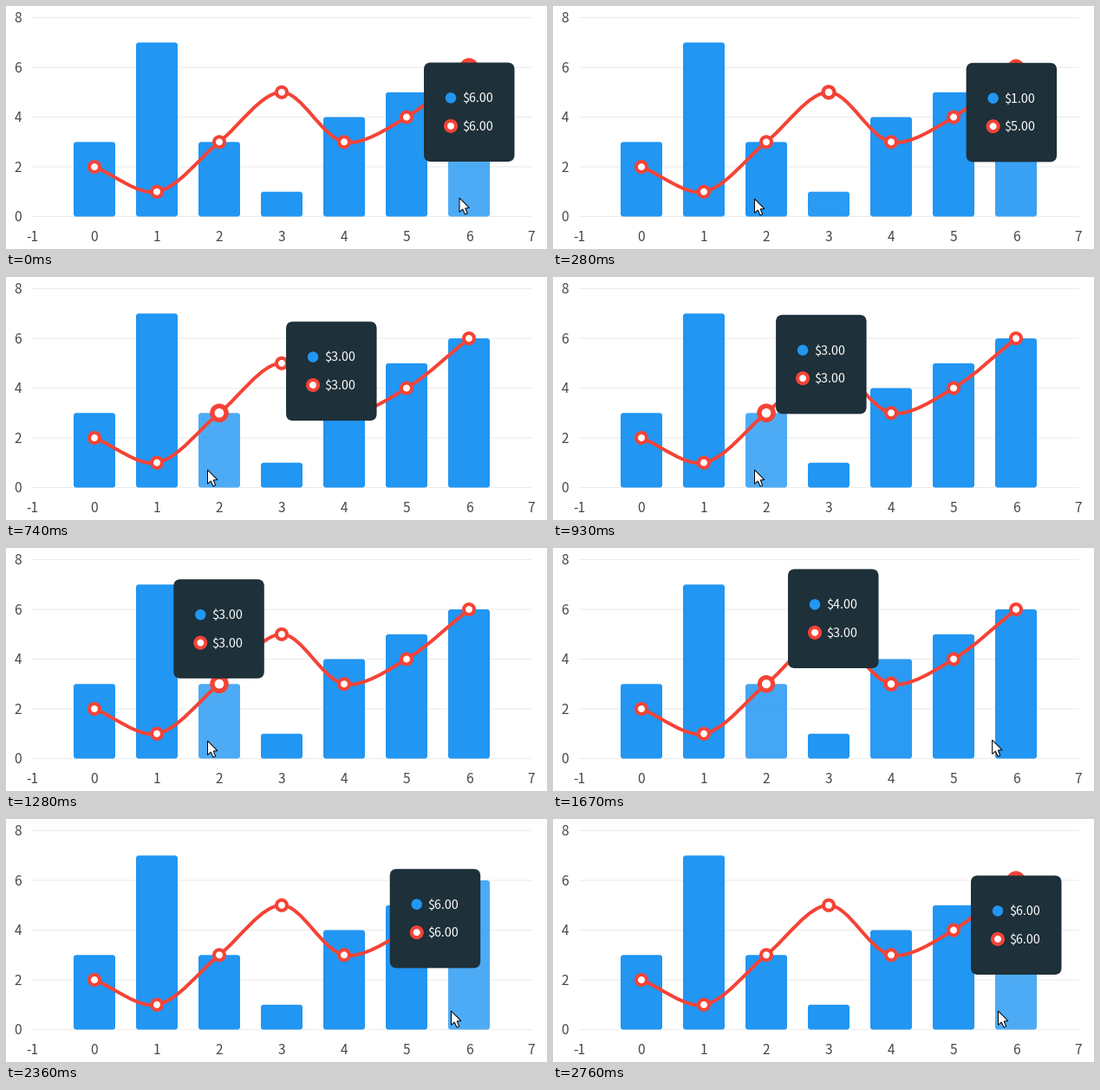
Write a matplotlib script that moves like this. It is 624x281 px and loops after 2.83 s.

```python
import numpy as np
import matplotlib.pyplot as plt
from matplotlib.animation import FuncAnimation
from matplotlib.patches import Circle, FancyBboxPatch, PathPatch, Polygon
from matplotlib.path import Path

W, H, DPI = 624, 281, 100
PX = 72 / DPI
LOOP, TICK, STEP = 2830, 10, 67
STEPS = LOOP // STEP
BLUE, RED, DARK, INK = "#2196f3", "#f44336", "#1e3039", "#484848"
FONT = ["Noto Sans CJK JP", "DejaVu Sans"]
FADE = 0.22
TIP_W, TIP_H = 104.5, 114.6

bars = [3, 7, 3, 1, 4, 5, 6]
line = [2, 1, 3, 5, 3, 4, 6]


def px(v):
    return 102 + 72 * v


def py(v):
    return 243.5 - 28.75 * v


def glide(k, start, end, a, b, power=1.0):
    """Ease out from a to b between two steps."""
    u = np.clip((k - start) / (end - start), 0, 1)
    return np.add(b, np.subtract(a, b) * (1 - u) ** power)


def cursor_at(k):
    left = (232.5, 223)
    if k < 23:
        return glide(k, 1, 4, (523, 222), left)
    return glide(k, 23, 25.05, left, (513.5, 222))


def tip_at(k):
    right, dip, left, peak = (482, 65.4), (455, 67.2), (193.3, 36.2), (271, 24.4)
    if k < 5:
        return glide(k, 3.75, 5, right, dip)
    if k < 23:
        return glide(k, 5, 16.9, dip, left)
    if k < 25:
        return glide(k, 23, 25, left, peak)
    return glide(k, 25, 40, peak, right, 1.53)


def hovered(k):
    # The hover state trails the cursor by one step
    x = cursor_at(max(k - 1, 0))[0]
    return int(np.clip(round((x - px(0)) / 72), 0, 6))


def fade_levels():
    level = np.arange(7) == hovered(0)
    out = []
    for k in range(STEPS):
        goal = np.arange(7) == hovered(k)
        level = np.clip(level + np.where(goal, FADE, -FADE), 0, 1)
        out.append(level)
    return out


def smooth_path(pts, s=0.65):
    p = np.vstack([pts[:1], pts, pts[-1:]])
    verts, codes = [pts[0]], [Path.MOVETO]
    for a, b, c, d in zip(p, p[1:], p[2:], p[3:]):
        m1, m2, m3 = (a + b) / 2, (b + c) / 2, (c + d) / 2
        l1, l2, l3 = (np.hypot(*v) for v in (b - a, c - b, d - c))
        q1 = m1 + (m2 - m1) * l1 / (l1 + l2)
        q2 = m2 + (m3 - m2) * l2 / (l2 + l3)
        verts += [b + (m2 - q1) * s, c + (m2 - q2) * s, c]
        codes += [Path.CURVE4] * 3
    return Path(verts, codes)


def rounded(x, y, w, h, r, **kw):
    box = FancyBboxPatch((x, y), w, h, lw=0,
                         boxstyle=f"round,pad=0,rounding_size={r}", **kw)
    return ax.add_patch(box)


def ring(x, y, z):
    return ax.add_patch(Circle((x, y), 6, fc="white", ec=RED, lw=4 * PX, zorder=z))


def label(x, y, s, size=15.5, color=INK, **kw):
    return ax.text(x, y, s, family=FONT, fontsize=size * PX, color=color,
                   va="baseline", **kw)


fig = plt.figure(figsize=(W / DPI, H / DPI), dpi=DPI, facecolor="white")
ax = fig.add_axes([0, 0, 1, 1])
ax.set(xlim=(0, W), ylim=(H, 0))
ax.axis("off")

for v in range(0, 9, 2):
    ax.plot([px(-1), px(7)], [py(v)] * 2, color="#ebebeb", lw=PX, zorder=1,
            snap=False)
    label(13.6, py(v) + 5.7, str(v), ha="center")
for v in range(-1, 8):
    label(px(v), 271.6, str(v), ha="center")

columns = [rounded(px(i) - 24, py(v), 48, py(0) - py(v), 3, fc=BLUE, zorder=2)
           for i, v in enumerate(bars)]
pts = np.array([(px(i), py(v)) for i, v in enumerate(line)])
ax.add_patch(PathPatch(smooth_path(pts), fc="none", ec=RED, lw=4 * PX, zorder=3))
dots = [ring(x, y, 4) for x, y in pts]

tip = rounded(0, 0, TIP_W, TIP_H, 8, fc=DARK, zorder=6)
bar_key = ax.add_patch(Circle((0, 0), 6.2, fc=BLUE, lw=0, zorder=7))
line_key = ring(0, 0, 7)
tip_texts = [label(0, 0, "", 14.4, "#f8f8f8", zorder=7) for _ in range(2)]

ARROW = np.array([(0, 0), (0, 16.3), (3.8, 12.9), (6.4, 18.9), (9.2, 17.7),
                  (6.7, 11.9), (11.4, 11.5)])
cursor = ax.add_patch(Polygon(ARROW, fc="white", ec="black", lw=PX, zorder=9))

levels = fade_levels()


def update(i):
    k = min((i * TICK + 8) // STEP, STEPS - 1)
    for col, dot, level in zip(columns, dots, levels[k]):
        scale = 1 + 0.35 * level
        col.set_alpha(1 - 0.2 * level)
        dot.set_radius(6 * scale)
        dot.set_linewidth(4 * scale * PX)

    x, y = tip_at(k)
    tip.set_bounds(x, y, TIP_W, TIP_H)
    n = hovered(k)
    rows = zip((bar_key, line_key), tip_texts, (bars[n], line[n]), (40.9, 73.4))
    for key, text, value, dy in rows:
        key.center = x + 31, y + dy
        text.set_text(f"${value:.2f}")
        text.set_position((x + 43.7, y + dy + 5))

    cursor.set_xy(ARROW + cursor_at(k))
    return []


anim = FuncAnimation(fig, update, frames=LOOP // TICK, interval=TICK,
                     repeat=True, repeat_delay=0, blit=False)
plt.show()
```
